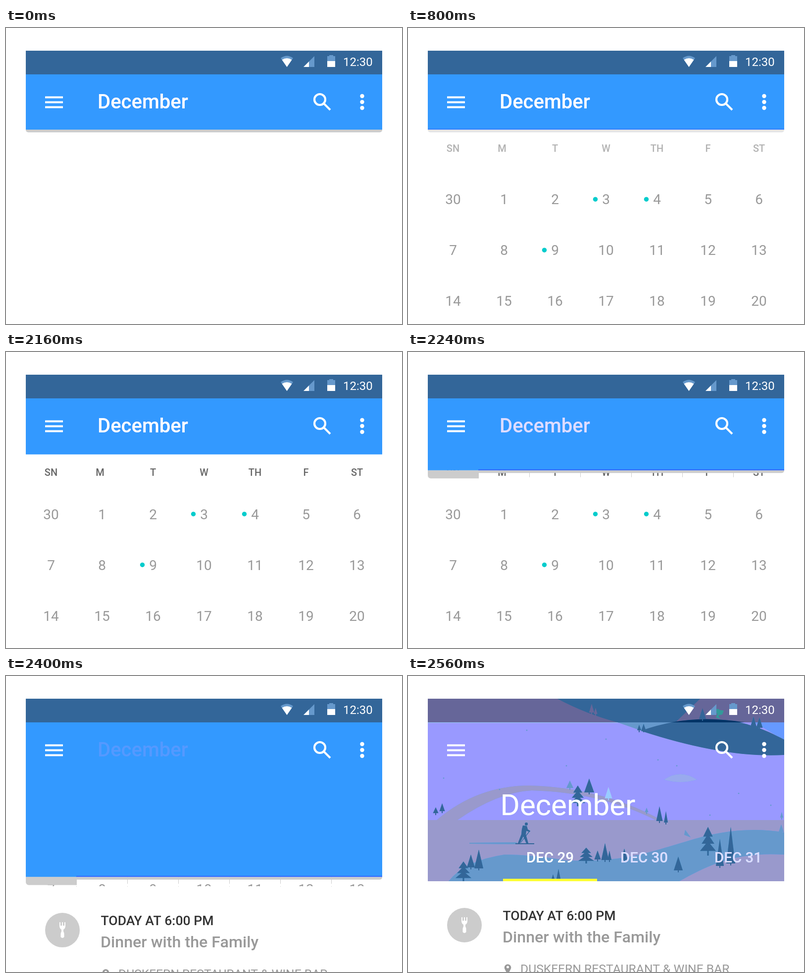
Write an HTML page with a canvas that moves like this. It is 800 by 600 pixels and loops after 3840 ms.

```html
<!DOCTYPE html>
<html lang="en">
<head>
<meta charset="utf-8">
<title>Calendar</title>
<style>
html, body { margin: 0; width: 100%; height: 100%; overflow: hidden; background: #fff; }
canvas { display: block; }
</style>
</head>
<body>
<canvas id="stage" width="800" height="600"></canvas>
<script>
const g = document.getElementById('stage').getContext('2d');
const LOOP = 3840, STEP = 40, COL = 103;
const clamp = v => Math.max(0, Math.min(1, v));
const inOut = t => t < .5 ? 4 * t ** 3 : 1 - 4 * (1 - t) ** 3;

function rect(x, y, w, h, color) {
  if (color) g.fillStyle = color;
  g.fillRect(x, y, w, h);
}
function disc(x, y, r, color) {
  if (color) g.fillStyle = color;
  g.beginPath();
  g.arc(x, y, r, 0, 7);
  g.fill();
}
function poly(...pts) {
  g.beginPath();
  for (let i = 0; i < pts.length; i += 2) g.lineTo(pts[i], pts[i + 1]);
  g.fill();
}
function text(str, x, y, size, weight, color, align = 'left') {
  if (color) g.fillStyle = color;
  g.font = `${weight} ${size}px Roboto, sans-serif`;
  g.textAlign = align;
  g.fillText(str, x, y);
}
function shape(d) { g.fill(new Path2D(d)); }

function weekdays() {
  ['SN', 'M', 'T', 'W', 'TH', 'F', 'ST'].forEach((d, i) =>
    text(d, i === 1 ? 190 : 91 + COL * i, 251, 20, 500, '#666', 'center'));
}
function dates(dy, rows = 3) {
  for (let i = 0; i < rows * 7; i++) {
    const x = 91 + COL * (i % 7), y = 338.5 + COL * Math.floor(i / 7) + dy;
    text(i || 30, x, y, 28, 400, '#999', 'center');
    if (i === 3 || i === 4 || i === 9) disc(x - 21.5, y - 10, 4.7, '#0cc');
  }
}

function statusIcons() {
  g.fillStyle = '#69c';
  shape('M555 61Q567.5 52 580 61L567.5 79Z M601 79L623 57V79Z M649 57h4v-2h8v2h4v22h-16Z');
  g.fillStyle = '#fff';
  shape('M557.500 64.500Q567.500 58 577.500 64.500L567.500 79Z M601 79L612 68V79Z M649 67h16v12h-16Z');
  text('12:30', 681, 77, 24, 400, '#fff');
}
function toolbarIcons() {
  g.fillStyle = g.strokeStyle = '#fff';
  for (let i = 0; i < 3; i++) {
    rect(79, 138.5 + 10 * i, 36, 4);
    disc(719.5, 138 + 12 * i, 4.2);
  }
  g.lineWidth = 4.2;
  g.beginPath();
  g.arc(634, 145, 11, 0, 7);
  g.moveTo(642, 153);
  g.lineTo(655, 166);
  g.stroke();
}

function tree(x, top, bottom, w) {
  poly(x, top, x + w / 2, bottom, x - w / 2, bottom);
  rect(x - 1, bottom, 2, 4);
}
function pine(x, top, bottom, w) {
  const h = (bottom - top) / 4;
  for (let i = 0; i < 3; i++) {
    const r = w * (.3 + .1 * i), y = top + h * i;
    poly(x, y, x + r, y + h * 1.35, x - r, y + h * 1.35);
  }
  rect(x - 1.5, bottom - h, 3, h);
}
function skier() {
  disc(239, 300, 3);
  shape('M232 303l8 1 2 7 5 3-1 2-7-2-1 7 5 18h-4l-6-14-7 14h-4l7-18 1-10Z');
  rect(217, 339, 38, 2);
  poly(245, 314, 246, 315, 228, 338, 227, 338);
}

// Each part passes through a half-blended tint before its full colour.
function scene(p) {
  const part = (tint, full, draw) => {
    [[tint, clamp(2 * p)], [full, clamp(2 * p - 1)]].forEach(([color, alpha]) => {
      if (!alpha) return;
      g.globalAlpha = alpha;
      g.fillStyle = color;
      draw();
    });
    g.globalAlpha = 1;
  };
  part('#69f', '#99f', () => rect(40, 46, 720, 370));
  part('#69f', '#9ae', () => shape('M517 210Q550 188 584 210Q550 220 517 210Z'));
  part('#69f', '#99c', () => {
    shape('M58 292Q140 222 245 222Q400 226 526 300L500 292Q390 236 250 232Q180 236 100 292Z');
    rect(40, 292, 720, 124);
  });
  part('#69f', '#69c', () => {
    shape('M82 416Q115 374 195 362Q250 362 320 374C440 378 490 356 560 336C630 314 690 306 760 317V362C660 356 606 384 548 416Z');
    poly(124, 338, 220, 337, 220, 341, 124, 340);
    poly(560, 312, 571, 327, 558, 322);
    tree(754, 301, 316, 10);
    [72, 207, 240, 110, 320, 182, 543, 182, 505, 170, 610, 282, 668, 238, 185, 230, 733, 262, 400, 128]
      .forEach((v, i, a) => i % 2 || disc(v, a[i + 1], 1.3));
  });
  part('#69f', '#69f', () => poly(700, 94, 760, 94, 760, 130));
  part('#69c', '#69c', () => shape('M424 94H545L478 113Z'));
  part('#69c', '#369', () => shape('M470 111Q540 87 600 87C675 87 720 108 760 129V160Q640 167 470 111Z'));
  part('#669', '#669', () => rect(40, 46, 720, 48));
  part('#69f', '#9cf', () => rect(40, 94, 384, 1));
  part('#369', '#369', () => shape('M302 46H590L540 94H424Q360 77 302 46Z'));
  part('#369', '#036', () => shape('M532 94Q600 81 680 94Z'));
  part('#669', '#669', () => { tree(371, 57, 74, 10); tree(379, 65, 77, 7); });
  part('#669', '#399', () => shape('M618 70q8-6 12-1l8 1-3 8-8 2 4 7-9-3 3-7Z'));
  part('#69f', '#69c', () => {
    tree(327, 212, 227, 14);
    tree(482, 267, 276, 7);
    tree(755, 276, 287, 6);
  });
  part('#c9f', '#9cf', () => tree(405, 225, 248, 15));
  part('#39c', '#369', () => {
    [[343, 222, 264, 30], [112, 376, 416, 32], [606, 306, 364, 32], [360, 348, 380, 32]]
      .forEach(t => pine(...t));
    [[366, 208, 236, 20], [143, 352, 390, 18], [127, 362, 388, 16], [546, 366, 394, 18],
     [652, 306, 380, 18], [630, 330, 385, 16], [383, 354, 372, 13], [398, 339, 373, 15],
     [407, 354, 373, 8], [437, 350, 373, 13], [304, 391, 411, 8], [293, 402, 412, 6],
     [698, 82, 104, 13], [710, 84, 105, 13], [467, 99, 110, 8], [476, 97, 110, 9]]
      .forEach(t => tree(...t));
    skier();
  });
  part('#669', '#369', () => tree(595, 65, 87, 14));
  part('#69f', '#369', () => {
    tree(508, 264, 294, 13);
    tree(521, 274, 297, 8);
    tree(56, 266, 278, 11);
    tree(69, 258, 274, 11);
  });
  part('#9c9', '#ff3', () => rect(192, 411, 190, 5));
  part('#9cf', '#fff', () => {
    text('December', 186.5, 282, 60, 400);
    text('DEC 29', 287, 378, 29.5, 500, '', 'center');
  });
  part('#9cf', '#ddf', () => {
    text('DEC 30', 477, 378, 29.5, 500, '', 'center');
    text('DEC 31', 667, 378, 29.5, 500, '', 'center');
  });
}

function agenda(top) {
  g.save();
  g.translate(0, top);
  rect(0, 0, 800, 600, '#fff');
  disc(114, 89, 35, '#ccc');
  g.fillStyle = '#fff';
  for (const x of [108, 113, 118]) rect(x, 73, 2, 9);
  shape('M108 80h12q0 6-4 8v4q1.500 2 1.500 6v5q-3.500 4-7 0v-5q0-4 1.500-6v-4q-4-2-4-8Z');
  text('TODAY AT 6:00 PM', 191.5, 79, 26.6, 500, '#333');
  text('Dinner with the Family', 191, 124, 32.2, 500, '#999');
  shape('M201.500 190l-5.500-11a6.800 6.800 0 1 1 11 0Z');
  disc(201.5, 174, 2.5, '#fff');
  text('DUSKFERN RESTAURANT & WINE BAR', 227, 185.5, 24.7, 400, '#999');
  g.restore();
}

function header(bottom) {
  rect(40, 94, 720, bottom - 94, '#39f');
  rect(40, 46, 720, 48, '#369');
}
function smallTitle(fade) {
  const write = (color, alpha) => {
    g.globalAlpha = clamp(alpha);
    text('December', 185, 163, 40, 500, color);
    g.globalAlpha = 1;
  };
  write('#99f', 2 - 2 * fade);
  write('#fff', 1 - 2 * fade);
}
function shadow(bottom, alpha) {
  g.globalAlpha = alpha;
  g.fillStyle = '#ccc';
  g.beginPath();
  g.roundRect(40, bottom, 720, 5.5, [0, 0, 5, 5]);
  g.fill();
  g.globalAlpha = 1;
}

function draw(ms) {
  const t = Math.floor(ms % LOOP / STEP) * STEP;
  const rise = clamp((t - 560) / 400);
  const days = clamp((t - 680) / 240);
  const open = inOut(clamp((t - 2115) / 365));
  const p = clamp((t - 2400) / 160);
  const bottom = 206 + 210 * open, top = 656 - 240 * open;
  const moving = open > .02 && open < 1;

  rect(0, 0, 800, 600, '#fff');
  shadow(206, 1 - days);
  if (t >= 600 && open < 1) {
    g.globalAlpha = days;
    weekdays();
    g.globalAlpha = 1;
    dates(292 * (1 - rise) ** 3);
  }
  if (open > 0) agenda(top);
  if (moving) {
    shadow(bottom, 1);
    g.beginPath();
    g.roundRect(40, bottom, COL, 16.5, [0, 0, 0, 6]);
    g.fill();
    for (let i = 1; i < 7; i++) {
      rect(39 + COL * i, bottom, 1, 14, '#ccc');
      rect(39 + COL * i, top, 1, 1);
    }
  }
  header(bottom);
  if (moving) rect(142, bottom - 2, 618, 2, '#36f');
  else if (t < 2160 && days) {
    g.globalAlpha = days;
    rect(40, 204, 720, 2, '#36f');
    g.globalAlpha = 1;
  }
  smallTitle(clamp((t - 2200) / 240));
  if (p) {
    scene(p);
    if (p < 1) {
      g.globalAlpha = .2 * Math.sin(Math.PI * p);
      weekdays();
      dates(0, 1);
      g.globalAlpha = 1;
      rect(47, 416, 706, 1, '#ccc');
    }
  }
  statusIcons();
  g.globalAlpha = 1 - .5 * Math.sin(Math.PI * p);
  toolbarIcons();
  g.globalAlpha = 1;
}

const start = performance.now();
function tick() {
  draw(performance.now() - start);
  requestAnimationFrame(tick);
}
tick();
</script>
</body>
</html>
```
